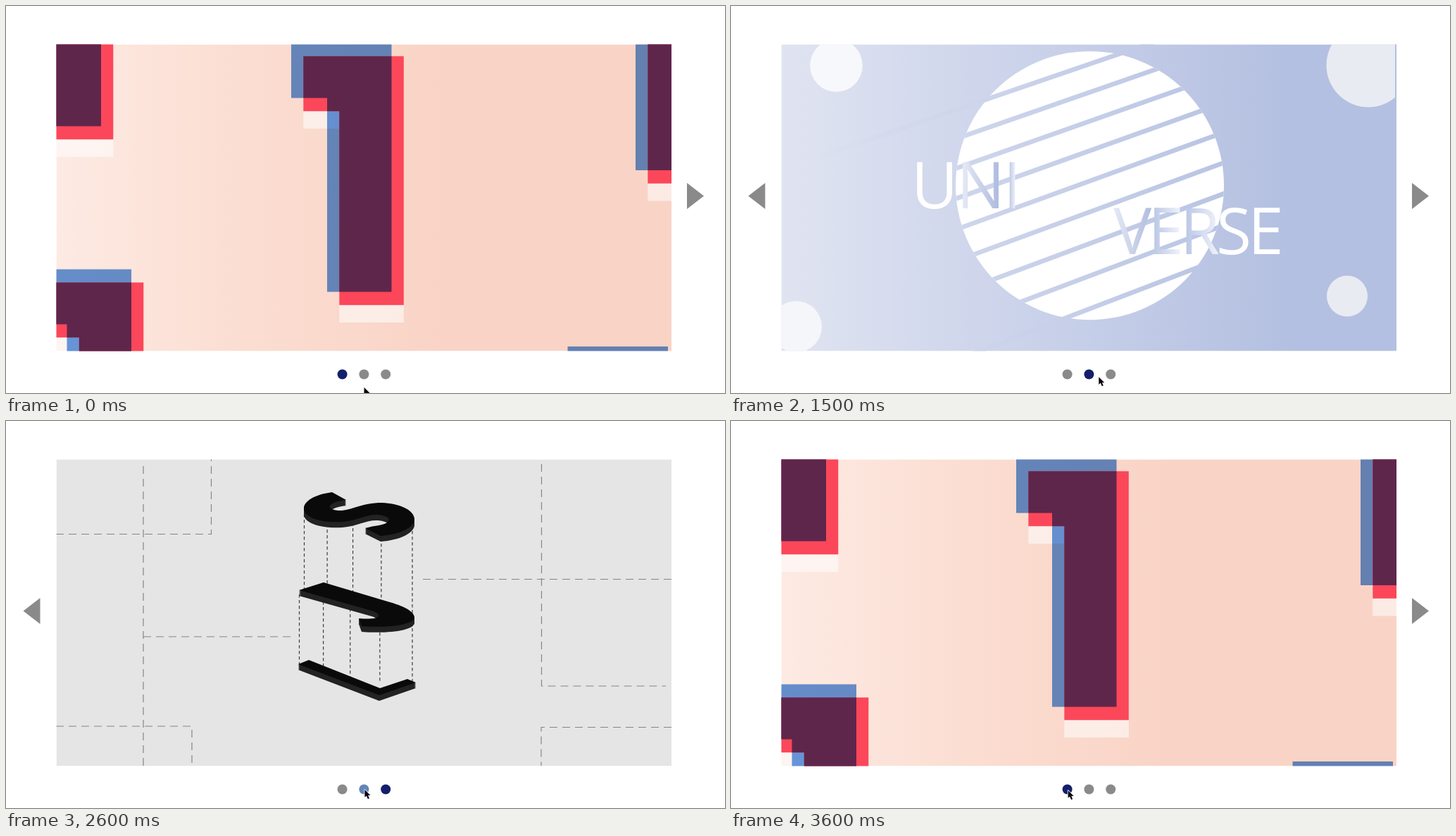
Animation of 1021 by 549 pixels, one loop 4 s. Source, as an HTML page with a canvas:

```html
<!DOCTYPE html>
<html lang="en">
<head>
<meta charset="utf-8">
<title>Slider</title>
<style>
  html, body { margin: 0; width: 100%; height: 100%; overflow: hidden; background: #fff; }
  canvas { display: block; }
</style>
</head>
<body>
<canvas id="stage" width="1021" height="549"></canvas>
<script>
const ctx = document.getElementById('stage').getContext('2d');
const W = 1021, H = 549, LOOP = 4000, STEP = 100;
const BOX = [71.5, 54.5, 873.5, 435];
const GREY = '#8a8a8a', NAVY = '#141f6b', HOVER = '#6285ba';
const DOT_Y = 522.5, DOT_R = 7;
const dotX = i => 477.6 + 30.8 * i;

// The pointer comes to a dot, then clicks it; a click shows that slide at once
const VISITS = [
  { arrive: 700, click: 1000, dot: 1, y: 527 },
  { arrive: 2000, click: 2100, dot: 2, y: 525 },
  { arrive: 2600, click: 2800, dot: 1, y: 523 },
  { arrive: 3500, click: 3600, dot: 0, y: 524 }
];

// Colours spread evenly from x1 to x2
function gradient(x1, x2, ...colors) {
  const g = ctx.createLinearGradient(x1, 0, x2, 0);
  colors.forEach((c, i) => g.addColorStop(i / (colors.length - 1), c));
  return g;
}

function backdrop(fill) {
  ctx.fillStyle = fill;
  ctx.fillRect(...BOX);
}

function circle(x, y, r) {
  const p = new Path2D();
  p.arc(x, y, r, 0, Math.PI * 2);
  return p;
}

function paint(path, fill) {
  ctx.fillStyle = fill;
  ctx.fill(path);
}

function line(x1, y1, x2, y2) {
  ctx.beginPath();
  ctx.moveTo(x1, y1);
  ctx.lineTo(x2, y2);
  ctx.stroke();
}

// Slide 1: copies of one blocky digit, placed by their top right corner
const ONES = [[135, -182.5], [547.5, 52.5], [178, 373.5], [985.5, -120], [940, 483]];

function one(x, y) {
  const p = new Path2D();
  p.rect(x - 142.5, y, 142.5, 78);
  p.rect(x - 91.5, y + 78, 91.5, 275);
  return p;
}

function layeredOne([x, y]) {
  const blue = one(x, y), red = one(x + 17.3, y + 18.7);
  paint(one(x + 17.3, y + 43.5), 'rgba(255,255,255,.55)');
  ctx.globalCompositeOperation = 'multiply';
  paint(blue, '#669ae4');
  ctx.globalCompositeOperation = 'source-over';
  paint(red, '#fb4759');
  ctx.save();
  ctx.clip(red);
  paint(blue, '#5f264b');
  ctx.restore();
}

function slideOne() {
  backdrop(gradient(71, 620, '#fdeae3', '#fbddd1', '#f9d4c6'));
  ONES.forEach(layeredOne);
}

// Slide 2: striped planet with lettering
const PLANET = { x: 509.5, y: 254.7, r: 190.5 };
const TONES = { '-': ['#fff', '#fff'], '>': ['#e6eaf6', '#aebbde'], '<': ['#bbc7e5', '#f1f3fa'] };

function stripe(k) {
  const y = 248.3 + 43.4 * k + 0.47 * k * k;
  const slope = -0.362 - 0.005 * k;
  const at = x => y + slope * (x - PLANET.x);
  line(110, at(110), 710, at(710));
}

// Each letter has its own tone: flat, darkening or lightening
function word(text, x, y, spacing, tones) {
  [...text].forEach((ch, i) => {
    const m = ctx.measureText(ch), left = x - m.actualBoundingBoxLeft;
    paintText(ch, x, y, gradient(left, x + m.actualBoundingBoxRight, ...TONES[tones[i]]));
    x += m.width + spacing;
  });
}

function paintText(text, x, y, fill) {
  ctx.fillStyle = fill;
  ctx.fillText(text, x, y);
}

function slideTwo() {
  backdrop(gradient(71, 790, '#e0e4f1', '#cad2ea', '#b4c0e1'));
  paint(circle(149.5, 84.5, 37.3), '#f7f8fb');
  paint(circle(92.5, 455, 36.5), '#f5f6fa');
  paint(circle(905, 84, 59.5), '#e9ebf2');
  paint(circle(875, 411.5, 29), '#e9ebf2');
  ctx.fillStyle = '#b4c0e1';
  ctx.fillRect(943, 54, 3, 90);

  const planet = circle(PLANET.x, PLANET.y, PLANET.r);
  paint(planet, '#fff');
  ctx.lineWidth = 6.6;
  ctx.strokeStyle = gradient(110, 710, 'rgba(214,219,237,0)', '#cfd6ec', '#c5cee8', '#b8c4e3');
  stripe(-4);
  stripe(4);
  ctx.save();
  ctx.clip(planet);
  for (let k = -3; k < 4; k++) stripe(k);
  ctx.restore();

  ctx.font = '400 91px "Open Sans", "Noto Sans", sans-serif';
  word('UNI', 256, 287, -2, '->' + '<');
  word('VERSE', 543, 351.5, -5, '><<--');
}

// Slide 3: extruded letters on a dashed plan
const PLAN = new Path2D(
  'M71 160.5H291.5V54M195 64V489M195 306H405M71 433H264V489' +
  'M945 224.5H586M760.5 61V376H937M945 434.5H760V489'
);
const SOLIDS = [
  'M463 101C440 104 423 113 423 124C423 138 450 145 478 143C500 141 512 132 528 133' +
  'C541 134 547 139 542 143C538 148 524 148 510 152L532 163C560 161 580 151 580 139' +
  'C579 125 557 117 534 116C503 116 490 128 472 127C460 126 456 121 464 117C470 114 476 113 483 112Z',
  'M416 240L451 229L545 257C570 264 580 272 580 279C578 289 545 294 505 291' +
  'L501 280C514 281 526 281 529 277C530 274 526 271 519 269Z',
  'M415 345L430 339L531 379L570 366L582 371L530 389Z'
].map(d => new Path2D(d));

// Five guides fanning out between two letters, which hide their ends
function guides(left, top, topStep, bottom, bottomStep) {
  for (let i = 0; i < 5; i++) {
    const u = i / 4, x = left + (577 - left) * u * (0.8 + 0.2 * u);
    line(x, top + topStep * i, x, bottom + bottomStep * i);
  }
}

function solid(shape) {
  ctx.save();
  ctx.translate(0, 8);
  for (let i = 0; i < 8; i++) {
    paint(shape, '#242223');
    ctx.translate(0, -1);
  }
  paint(shape, '#0a0a0a');
  ctx.restore();
}

function slideThree() {
  backdrop('#e5e5e5');
  ctx.lineWidth = 1.2;
  ctx.strokeStyle = '#858585';
  ctx.setLineDash([11, 7]);
  ctx.stroke(PLAN);
  ctx.strokeStyle = '#3f383c';
  ctx.setLineDash([4.5, 3.5]);
  guides(423.5, 132, 6, 240, 9);
  guides(416.5, 246, 10, 348, 8);
  ctx.setLineDash([]);
  SOLIDS.forEach(solid);
}

const DRAW = [slideOne, slideTwo, slideThree];

function pointerAt(t) {
  let x = 508.5, y = 541, leave = 0;
  for (const v of VISITS) {
    const u = Math.min(1, Math.max(0, (t - leave) / (v.arrive - leave)));
    const e = u * u * (3 - 2 * u);
    x += (dotX(v.dot) + 1 - x) * e;
    y += (v.y - y) * e;
    leave = v.click + 100;
  }
  return [x, y];
}

const ARROW = new Path2D('M0 0V10.8L2.5 8.7L4.5 13.2L6.5 12.3L4.7 8H8Z');

function pointer(x, y) {
  ctx.save();
  ctx.translate(x, y);
  ctx.lineJoin = 'round';
  ctx.lineWidth = 1.6;
  ctx.strokeStyle = '#fff';
  ctx.stroke(ARROW);
  paint(ARROW, '#0b0510');
  ctx.restore();
}

function navArrow(x, dir) {
  paint(new Path2D(`M${x} 251L${x + 24 * dir} 269.5L${x} 288Z`), GREY);
}

function render(t) {
  const slide = VISITS.reduce((s, v) => t >= v.click ? v.dot : s, 0);
  const [px, py] = pointerAt(t);
  ctx.clearRect(0, 0, W, H);

  ctx.save();
  ctx.beginPath();
  ctx.rect(...BOX);
  ctx.clip();
  DRAW[slide]();
  ctx.restore();

  if (slide > 0) navArrow(48.5, -1);
  if (slide < 2) navArrow(967, 1);
  for (let i = 0; i < 3; i++) {
    const over = Math.hypot(px - dotX(i), py - DOT_Y) < DOT_R;
    paint(circle(dotX(i), DOT_Y, DOT_R), i === slide ? NAVY : over ? HOVER : GREY);
  }
  pointer(px, py);
}

const start = performance.now();
function tick() {
  const t = (performance.now() - start) % LOOP;
  render(Math.floor(t / STEP) * STEP);
  requestAnimationFrame(tick);
}
tick();
</script>
</body>
</html>
```
